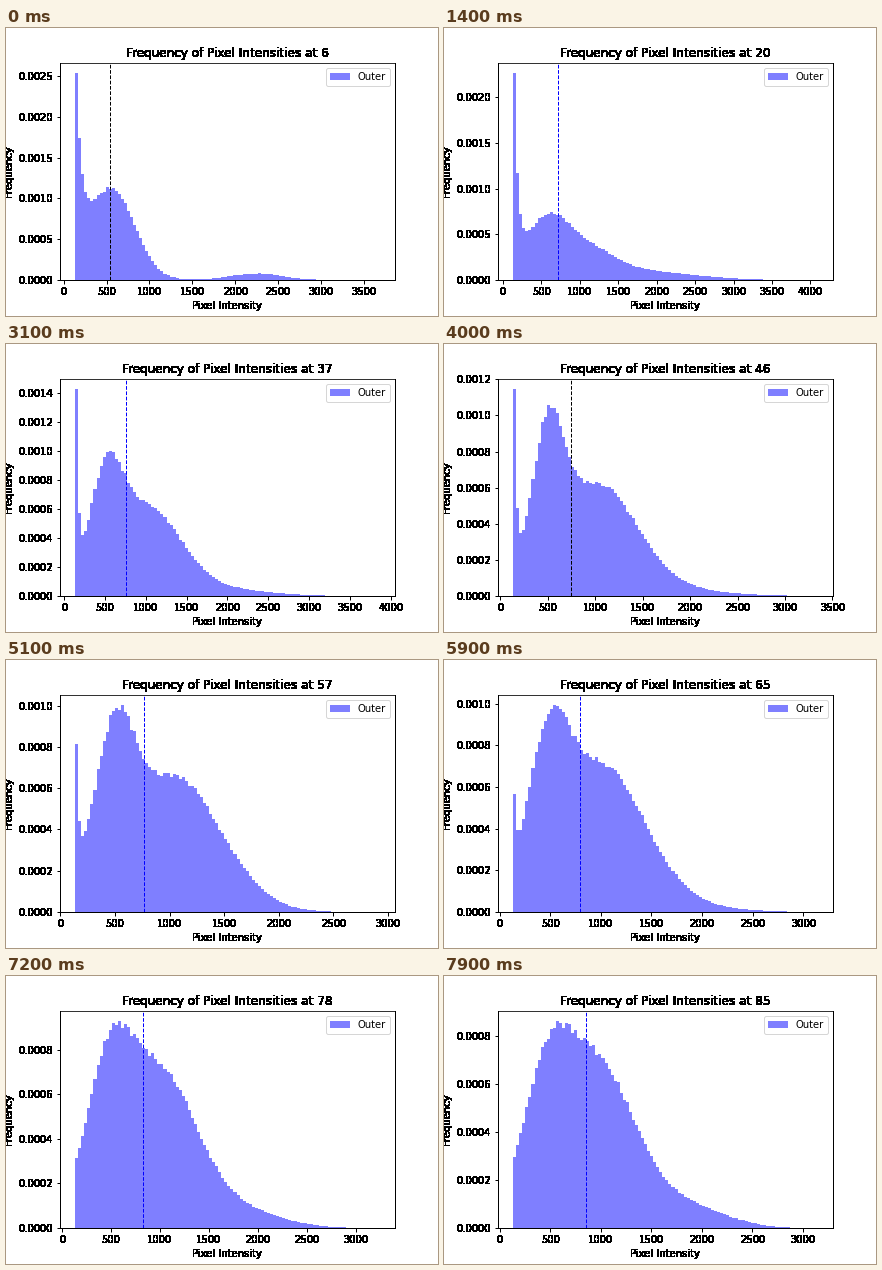
Recreate the animation shown at these times as a matplotlib script. Size 432 px wide and 288 px high, loop 8 s.

```python
import numpy as np
import matplotlib.pyplot as plt
from matplotlib.animation import FuncAnimation

FRAMES, BINS, FIRST, LOW = 80, 100, 6, 135

plt.rcParams.update({
    "font.family": "DejaVu Sans", "font.size": 10,
    "axes.linewidth": 1, "xtick.major.width": 1, "ytick.major.width": 1,
})


def track(i, *points):
    """Value at step i on a path through (step, value) points."""
    return np.interp(i, *zip(*points))


def bell(x, height, center, width):
    return height * np.exp(-((x - center) / width) ** 2 / 2)


def bumps(x, i):
    """Main hump, the shoulder that grows beside it, and a long tail."""
    main = bell(x, track(i, (0, 112), (14, 50), (40, 76), (79, 42)),
                track(i, (0, 550), (79, 455)),
                track(i, (0, 275), (14, 265), (40, 165), (79, 230)))
    shoulder = bell(x, track(i, (0, 0), (22, 58), (79, 68)),
                    track(i, (0, 950), (51, 1040), (79, 935)),
                    track(i, (0, 390), (51, 430), (79, 410)))
    tail = bell(x, track(i, (0, 8), (14, 9), (51, 0), (79, 7)),
                track(i, (0, 2250), (14, 1850), (79, 1950)),
                track(i, (0, 300), (14, 650), (79, 350)))
    return main + shoulder + tail


def histogram(i):
    """Bin edges and densities at step i."""
    high = track(i, (0, 3680), (9, 3740), (14, 4093), (27, 4095),
                 (40, 3344), (51, 2923), (66, 3330), (79, 3144))
    edges = np.linspace(LOW, high, BINS + 1)
    x = (edges[1:] + edges[:-1]) / 2
    rng = np.random.default_rng(100 + i)
    dens = bumps(x, i) * (1 + 0.02 * rng.uniform(-1, 1, BINS))

    # The lowest bin spikes, then decays into the humps
    spike = track(i, (0, 253.8), (14, 226.9), (22, 170.3), (40, 114.7), (66, 29))
    decay = track(i, (0, 68), (14, 48), (22, 28), (79, 20))
    dens += max(spike - dens[0], 0) * np.exp((x[0] - x) / decay)

    peak = max(spike, track(i, (51, 100.3), (66, 98.6), (79, 86.3)))
    return edges, dens * peak / dens.max() * 1e-5


def harden(img, dpi):
    """Turn soft glyph edges solid black."""
    out = np.zeros_like(img)
    out[..., 3] = img[..., 3] > 0
    return out, 0, 0


fig = plt.figure(figsize=(6, 4), dpi=72, facecolor="white")
fig.subplots_adjust(left=0.125, right=0.9, bottom=0.125, top=0.88)
ax = fig.add_subplot()


def update(i):
    ax.cla()
    edges, dens = histogram(i)
    ax.stairs(dens, edges, fill=True, color="blue", alpha=0.5, lw=0,
              label="Outer")
    mark = track(i, (0, 535), (14, 718), (22, 771), (40, 743),
                 (51, 765), (79, 855))
    ax.axvline(mark, color="black" if i % 40 < 4 else "blue", ls="--", lw=1)
    pad = 0.05 * (edges[-1] - edges[0])
    ax.set_xlim(edges[0] - pad, edges[-1] + pad)
    ax.set_ylim(0, dens.max() * 1.05)
    ax.spines.top.set_linewidth(0.8)
    ax.set_title(f"Frequency of Pixel Intensities at {FIRST + i}")
    ax.set_xlabel("Pixel Intensity")
    ax.set_ylabel("Frequency")
    ax.legend(loc="upper right")
    labels = [*ax.get_xticklabels(), *ax.get_yticklabels()]
    for text in [ax.title, ax.xaxis.label, ax.yaxis.label, *labels]:
        text.set_agg_filter(harden)
    return []


anim = FuncAnimation(fig, update, frames=FRAMES, init_func=lambda: [],
                     interval=100, repeat=True, repeat_delay=0)
plt.show()
```
